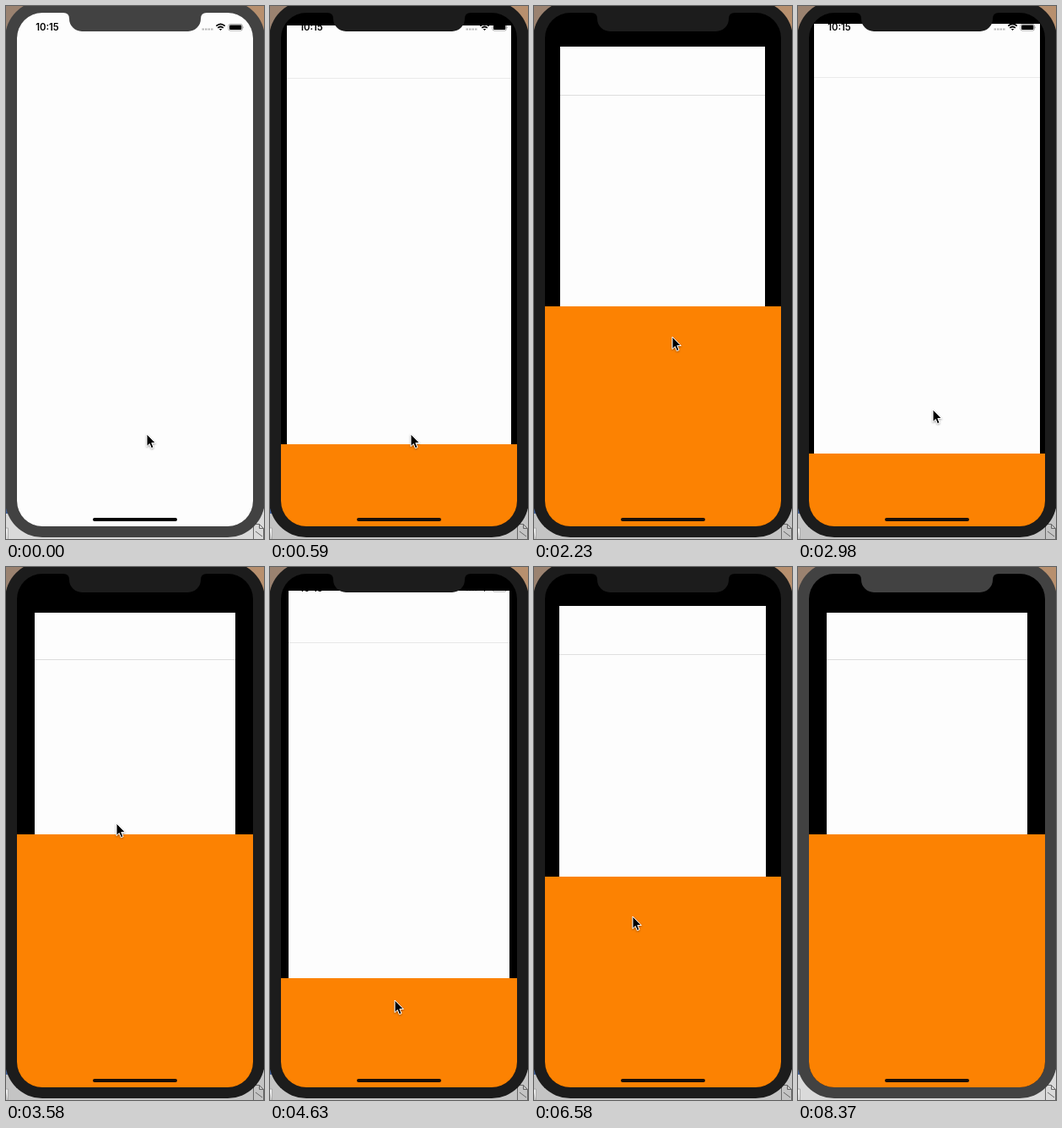
Write an HTML page that moves like this. It is 306 px wide and 630 px high and loops after 8470 ms.

```html
<!DOCTYPE html>
<html lang="en">
<head>
<meta charset="utf-8">
<title>Half sheet presentation</title>
<style>
  html, body { margin: 0; width: 100%; height: 100%; overflow: hidden; }
  svg { display: block; width: 306px; height: 630px; }
  .time { font: 600 11.3px Inter, Roboto, sans-serif; text-anchor: middle; }
</style>
</head>
<body>
<svg viewBox="0 0 306 630">
  <defs>
    <linearGradient id="wall">
      <stop offset="0" stop-color="#9a8270"/>
      <stop offset="1" stop-color="#b8906e"/>
    </linearGradient>
    <clipPath id="screen"><rect x="13" y="8" width="280" height="607" rx="30"/></clipPath>
    <filter id="soft" x="-50%" y="-50%" width="200%" height="200%">
      <feDropShadow dx="0" dy="1" stdDeviation=".8" flood-opacity=".4"/>
    </filter>
  </defs>

  <rect width="306" height="300" fill="url(#wall)"/>
  <rect id="desk" y="300" width="306" height="330"/>
  <path d="M0 573h2v27h-2z" fill="#3f5f9a"/>
  <path d="M-1 617h3.500v14" fill="#eee" stroke="#aaa"/>
  <path d="M293.500 630V612.500h7l5 5V630M300.500 612.500v5h5M296 621l8 6" fill="none" stroke="#666"/>

  <rect id="bezel" x="-1" y="-6" width="308" height="634" rx="44"/>
  <g clip-path="url(#screen)">
    <rect x="13" y="8" width="280" height="607"/>
    <rect id="page" fill="#fdfdfd"/>
    <rect id="rule" height="1" fill="#000"/>
    <text class="time" x="49" y="29">10:15</text>
    <path d="M232.500 27.500h13" stroke="#000" stroke-opacity=".28" stroke-width="2" stroke-dasharray="2.500 1"/>
    <g fill="none" stroke="#000" stroke-width="1.700">
      <path d="M249.300 23.600q5.200-4.600 10.400 0M251.200 25.900q3.300-2.800 6.600 0"/>
      <path d="M252.700 27.100h3.600l-1.800 2z" fill="#000" stroke="none"/>
    </g>
    <rect x="263.900" y="21.400" width="16.600" height="7.700" rx="2.200" fill="none" stroke="#000" stroke-opacity=".4" stroke-width=".8"/>
    <rect x="265" y="22.500" width="14.400" height="5.500" rx="1.200"/>
    <path d="M281.400 24v2.600q1.200-1.300 0-2.600" fill-opacity=".5"/>
    <rect id="sheet" x="13" width="280" height="310" fill="#fc8202"/>
    <rect id="home" x="103" y="605" width="100" height="4" rx="2"/>
  </g>
  <path id="notch" d="M68 7V8q7 0 7 7a15 15 0 0 0 15 15H216a15 15 0 0 0 15-15q0-7 7-7V7z"/>
  <path id="cursor" d="M0 0V14.500L3.300 11.500 5.400 16.700 8 15.600 5.800 10.500H10.300z" stroke="#fff" stroke-width="1" filter="url(#soft)"/>
</svg>

<script>
const LOOP = 8470, OPEN = 316, CLOSED = 615;
const $ = id => document.getElementById(id);
const set = (id, attrs) => {
  for (const name in attrs) $(id).setAttribute(name, attrs[name]);
};

// Tracks: [time, ...values], eased between neighbours.
const sheetTrack = [
  [400, CLOSED], [900, OPEN],
  [1980, OPEN], [2900, 529], [2980, 529], [3500, OPEN],
  [4400, OPEN], [4630, 486], [5080, CLOSED],
  [6210, CLOSED], [6710, OPEN]
];
const cursorTrack = [
  [590, 167, 506], [1190, 136, 277], [1340, 136, 277], [1630, 164, 355],
  [1980, 164, 355], [2830, 163, 526], [2980, 160, 477], [3580, 131, 303],
  [3880, 131, 303], [4180, 149, 356], [4400, 149, 356], [4630, 148, 512],
  [4780, 147, 540], [5230, 145, 496], [5380, 145, 496], [5680, 129, 545],
  [5830, 126, 542], [6280, 126, 542], [6580, 117, 413], [6880, 117, 355],
  [7030, 117, 355], [7330, 203, 592]
];

const smooth = u => u * u * (3 - 2 * u);

function sample(track, t) {
  const next = track.findIndex(key => key[0] > t);
  if (next === 0) return track[0].slice(1);
  if (next < 0) return track.at(-1).slice(1);
  const a = track[next - 1], b = track[next];
  const u = smooth((t - a[0]) / (b[0] - a[0]));
  return a.slice(1).map((v, i) => v + (b[i + 1] - v) * u);
}

// The picture advances in 150 ms ticks.
function tick(t) {
  const offset = t < 1480 ? 140 : 130;
  return offset + Math.floor((t - offset) / 150) * 150;
}

function draw(t) {
  const focused = t >= 300 && t < 8370;
  const now = tick(t);
  const [top] = sample(sheetTrack, now);
  const [x, y] = sample(cursorTrack, now);
  const shown = (CLOSED - top) / (CLOSED - OPEN);
  const scale = 1 - 0.15 * shown;
  const width = 280 * scale, height = 607 * scale;
  const left = 153 - width / 2, pageTop = 311.5 - height / 2;
  const body = focused ? "#1c1c1c" : "#424242";

  set("desk", { fill: focused ? "#c4c4c4" : "#dadada" });
  set("bezel", { fill: body });
  set("notch", { fill: body });
  set("page", { x: Math.round(left), y: Math.round(pageTop), width: Math.round(width), height });
  set("rule", {
    x: Math.round(left), y: Math.round(pageTop + 65.7 * scale), width: Math.round(width),
    opacity: shown && 0.05 + 0.08 * shown
  });
  set("sheet", { y: Math.round(top) });
  set("home", { fill: top < 605 ? "#1a0f08" : "#000" });
  set("cursor", {
    transform: `translate(${Math.round(x)} ${Math.round(y)})`,
    visibility: t < 7630 ? "visible" : "hidden"
  });
}

const start = performance.now();
function frame() {
  draw((performance.now() - start) % LOOP);
  requestAnimationFrame(frame);
}
frame();
</script>
</body>
</html>
```
